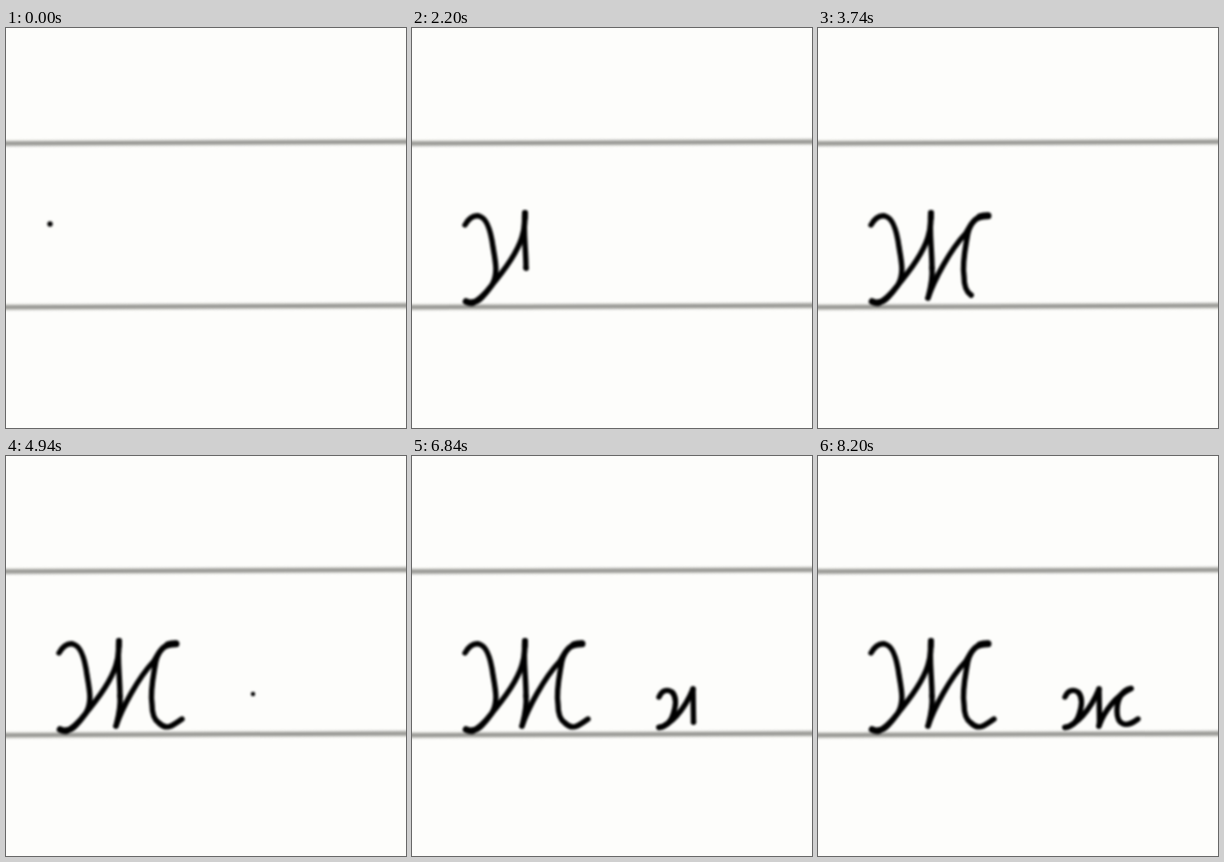
These frames come from a looping animation (400x400 px, 8230 ms). An HTML page:

```html
<!DOCTYPE html>
<html lang="en">
<head>
<meta charset="utf-8">
<title>Handwritten letter</title>
<style>
  html, body { margin: 0; width: 100%; height: 100%; overflow: hidden; background: #fdfdfb; }
  svg { display: block; width: 100vw; height: 100vh; }
  path { fill: none; stroke-linecap: round; stroke-linejoin: round; }
</style>
</head>
<body>
<svg viewBox="0 0 400 400">
  <defs>
    <filter id="soft" filterUnits="userSpaceOnUse" x="-10" y="0" width="420" height="400" color-interpolation-filters="sRGB">
      <feGaussianBlur stdDeviation="0.9"/>
    </filter>
  </defs>
  <g id="rules" filter="url(#soft)"></g>
  <g id="ink" filter="url(#soft)" stroke="#000"></g>
</svg>
<script>
const LOOP = 8230;
const PEN = 5.4;
const layer = id => document.getElementById(id);

function addPath(parent, d, width, color) {
  const p = document.createElementNS('http://www.w3.org/2000/svg', 'path');
  p.setAttribute('d', d);
  p.setAttribute('stroke-width', width);
  if (color) p.setAttribute('stroke', color);
  parent.appendChild(p);
  return p;
}

for (const y of [115.4, 279.2]) {
  const d = `M-6,${y} L406,${y - 1.7}`;
  addPath(layer('rules'), d, 7, '#dededa');
  addPath(layer('rules'), d, 4, '#9c9c98');
}

// path, start ms, end ms, optional pen width
const strokes = [
  // capital
  ['M53,197 C57,190 62,187 67,188 C75,190 79,204 81,219 C84,236 86,246 80,257 C73,267 64,279 54,273.5', 120, 900],
  ['M54,273.5 Q58,275.5 61,274.5', 860, 910, 6.6],
  ['M61,274.5 C69,271 76,262 84,252 C97,236 108,220 111,205 C113,198 113,192 113,185', 900, 1700],
  ['M113,185 L112.8,190', 1670, 1720, 6],
  ['M113,185 C111,205 114,220 114,240', 1700, 2200],
  ['M114,240 C115,252 112,262 110,270', 2200, 2430],
  ['M110,270 C116,252 132,222 148,205 C153,197 156,187.5 170,187.5', 2430, 3000],
  ['M162,188.8 Q165,187.7 170,187.7', 2950, 3020, 7],
  ['M170,187.5 C157,188 151,196 149,210 C147,222 144,236 146,248 C146,258 148,264 153,267', 3000, 3740],
  ['M153,267 C160,274 165,271 176,263', 3740, 3950],
  // small letter
  ['M247,241 C250,234 255,233 260,236 C265,241 264,250 261,259', 5300, 5740],
  ['M261,259 C259,265 254,271 247,271.5', 5740, 5950],
  ['M247,271.5 C258,269 272,255 281,233', 5950, 6450],
  ['M281,233 L281.5,266', 6450, 6840],
  ['M281.5,266 L281,270', 6840, 6890],
  ['M281,270 C286,255 298,240 313,232.5', 6890, 7300],
  ['M313,232.5 C303,234 299,245 299,255 C299,268 307,273 320,263', 7300, 7950]
];

// pen resting on the paper
const dots = [
  ['M44,196 h0.01', 0, 120, 5.4],
  ['M247,238 h0.01', 4900, 5300, 4.4]
];

const parts = [...strokes, ...dots].map(([d, start, end, width = PEN], i) => {
  const path = addPath(layer('ink'), d, width);
  return { start, end, path, dot: i >= strokes.length, length: path.getTotalLength() };
});

function render(t) {
  for (const { start, end, path, dot, length } of parts) {
    const visible = t >= start && (!dot || t < end);
    const drawn = length * Math.min(1, Math.max(0, (t - start) / (end - start)));
    path.style.display = visible ? '' : 'none';
    if (!dot) path.style.strokeDasharray = t >= end ? 'none' : `${drawn} ${length + 10}`;
  }
}

const origin = performance.now();
function tick() {
  render((performance.now() - origin) % LOOP);
  requestAnimationFrame(tick);
}
render(0);
requestAnimationFrame(tick);
</script>
</body>
</html>
```
